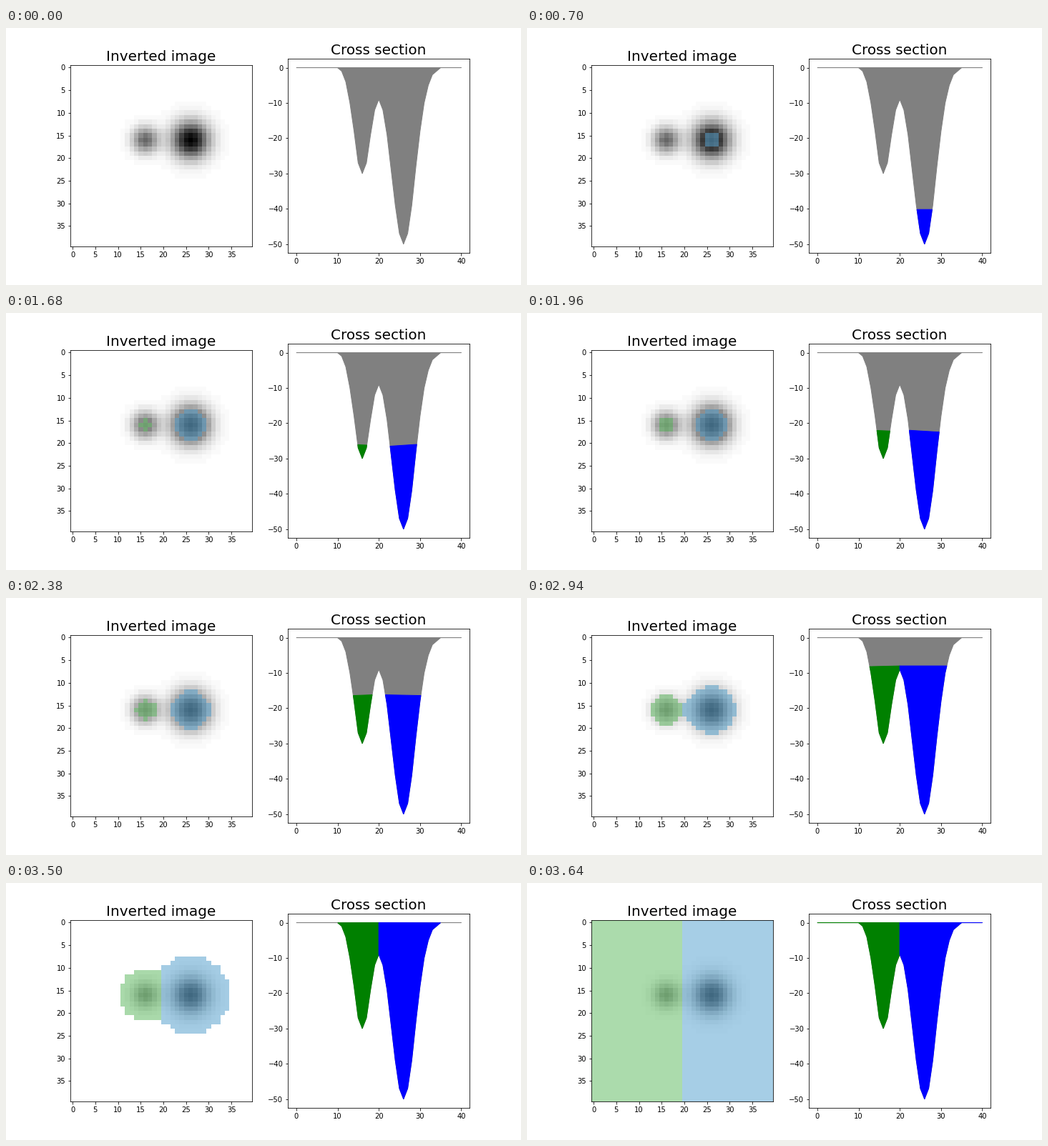
Animation of 720 by 360 pixels, one loop 3.78 s. Source, as a matplotlib script:

```python
import numpy as np
import matplotlib.pyplot as plt
from matplotlib.animation import FuncAnimation

FRAMES, INTERVAL = 27, 140
SPLIT = 20                      # column where the two basins meet
GREEN = (116, 196, 118, 153)
BLUE = (107, 174, 214, 153)


def depth(x, y):
    """Two rounded Gaussian wells, as whole negative levels."""
    small = 30 * np.exp(-((x - 16) ** 2 + (y - 16) ** 2) / 8)
    large = 50 * np.exp(-((x - 26) ** 2 + (y - 16) ** 2) / 16)
    return -np.round(small + large)


cols, rows = np.meshgrid(np.arange(40), np.arange(40))
image = depth(cols, rows)
basins = np.zeros((40, 40, 4), np.uint8)
basins[:, :SPLIT] = GREEN
basins[:, SPLIT:] = BLUE

nodes = np.arange(41)
xs = np.arange(801) / 20
ys = np.interp(xs, nodes, depth(nodes, 16))

plt.rcParams["font.family"] = "DejaVu Sans"
fig, (left, right) = plt.subplots(1, 2, figsize=(10, 5), dpi=72)
fig.subplots_adjust(left=0.125, right=0.9, bottom=0.125, top=0.88, wspace=0.2)

left.set_title("Inverted image", fontsize=20)
left.imshow(image, cmap="gray", vmin=-50, vmax=0, interpolation="nearest")
overlay = left.imshow(np.zeros_like(basins), interpolation="nearest")
left.set_xticks(range(0, 40, 5))
left.set_yticks(range(0, 40, 5))

right.set_title("Cross section", fontsize=20)
right.fill(xs, ys, color="gray", lw=1)
green_fill, = right.fill([0, 0, 0], [0, 0, 0], color="green", lw=1)
blue_fill, = right.fill([0, 0, 0], [0, 0, 0], color="blue", lw=1)
right.set(xlim=(-2, 42), ylim=(-52.5, 2.5),
          xticks=range(0, 41, 10), yticks=range(-50, 1, 10))


def flood(patch, side, level, wall_first):
    """Fill one basin up to the level, against the wall once it is reached."""
    wet = side & (ys < level)
    patch.set_visible(bool(wet.any()))
    if not wet.any():
        return
    points = np.column_stack([xs[wet], ys[wet]])
    if ys[xs == SPLIT][0] < level:
        wall = [[SPLIT, min(level, 0)]]
        parts = [wall, points] if wall_first else [points, wall]
        points = np.vstack(parts)
    patch.set_xy(points)


def update(i):
    level = -50 + 2 * i
    overlay.set_data(np.where((image < level)[..., None], basins, 0).astype(np.uint8))
    flood(green_fill, xs <= SPLIT, level, False)
    flood(blue_fill, xs >= SPLIT, level, True)
    return overlay, green_fill, blue_fill


anim = FuncAnimation(fig, update, frames=FRAMES, interval=INTERVAL,
                     init_func=lambda: update(0), repeat=True, repeat_delay=0)
plt.show()
```
